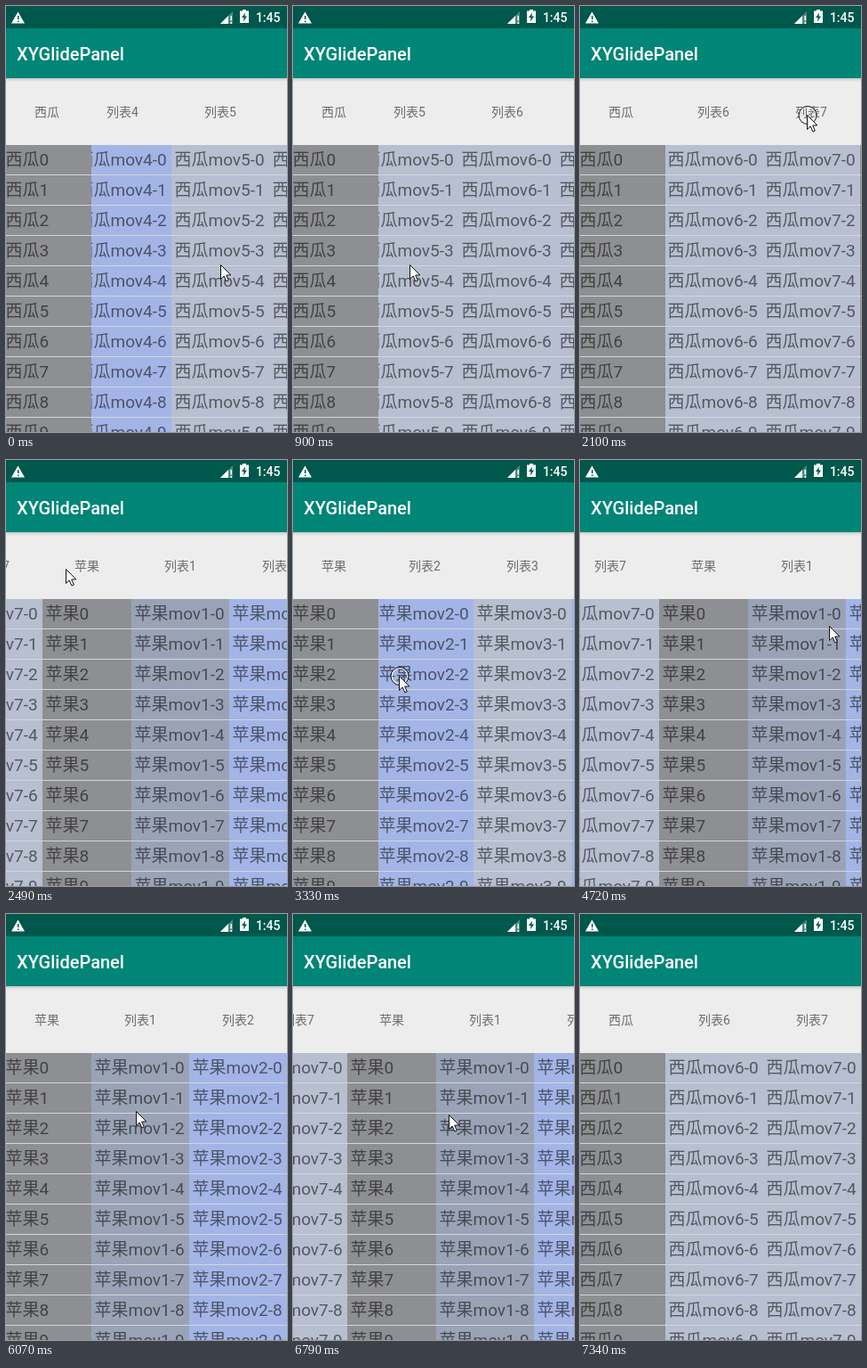
Animation, 316 px wide and 478 px high, one loop 8300 ms. Source, as an HTML page with a canvas:

```html
<!DOCTYPE html>
<html lang="zh-CN">
<head>
<meta charset="utf-8">
<style>
html, body { margin: 0; width: 100%; height: 100%; overflow: hidden; background: #ededed; }
canvas { display: block; }
</style>
</head>
<body>
<canvas id="stage" width="316" height="478"></canvas>
<script>
const ctx = document.getElementById('stage').getContext('2d');
const W = 316, H = 478, LOOP = 8300;
const FONT = 'Roboto, "Noto Sans CJK SC", "Noto Sans CJK", sans-serif';
const INK = 'rgba(0,0,0,.54)', BAR = '#00574b';
const TOP = 156, ROW = 34, FIRST = 100, COL = 110, GROUP = FIRST + 7 * COL, PIN = 96;
const GREY = '#8e8f93', SLATE = '#9aa3b6', BLUE = '#a3b5e6', PALE = '#b7bfd0';
const FILLS = [GREY, SLATE, BLUE, PALE, BLUE, PALE, PALE, PALE];
const GROUPS = ['西瓜', '苹果'];

// Scroll offsets where the first group ends and the second begins.
const END = GROUP - W, BEGIN = GROUP + FIRST - PIN;
const START = 354, SETTLE = 220, RING = 120;

// Horizontal drags; the last one only takes the pointer off the stage.
const DRAGS = [
  { down: 300, up: 900, y: 290, from: 241, to: 131 },
  { down: 1200, up: 1700, y: 240, from: 240, to: 150 },
  { down: 2100, up: 2400, y: 122, from: 256, to: 67 },
  { down: 2800, up: 3080, y: 242, from: 260, to: 147 },
  { down: 3330, up: 3800, y: 242, from: 119, to: 232 },
  { down: 4420, up: 4720, y: 186, from: 189, to: 280 },
  { down: 5530, up: 5850, y: 221, from: 265, to: 146 },
  { down: 6640, up: 7000, y: 225, from: 110, to: 264 },
  { down: 7340, up: LOOP, y: 225, from: 340, to: 340 }
];

// A drag that stops between the groups snaps on in its own direction.
let offset = START;
for (const d of DRAGS) {
  d.start = offset;
  d.free = offset + d.from - d.to;
  const between = d.free > END && d.free < BEGIN;
  offset = d.rest = between ? (d.to < d.from ? BEGIN : END) : d.free;
}

const mix = (a, b, u) => a + (b - a) * u;
const part = (t, a, b) => Math.min(1, Math.max(0, (t - a) / (b - a)));
const smooth = u => u * u * (3 - 2 * u);
const easeOut = u => 1 - (1 - u) ** 2;

function pose(t) {
  const i = Math.max(0, DRAGS.findLastIndex(d => t >= d.down));
  const d = DRAGS[i], next = DRAGS[i + 1] || d;
  const dragged = part(t, d.down, d.up);
  const settled = easeOut(part(t, d.up, d.up + SETTLE));
  const glide = next === d ? 0 : smooth(part(t, d.up + SETTLE, next.down));
  return {
    scroll: Math.round(mix(mix(d.start, d.free, dragged), d.rest, settled)),
    x: Math.round(mix(mix(d.from, d.to, dragged), next.from, glide)),
    y: Math.round(mix(d.y, next.y, glide)),
    pressed: t >= d.down && t < d.down + RING
  };
}

function rect(x, y, w, h, fill) {
  ctx.fillStyle = fill;
  ctx.fillRect(x, y, w, h);
}

function text(str, x, y, size, fill = INK, weight = 400, align = 'left') {
  ctx.font = `${weight} ${size}px ${FONT}`;
  ctx.textAlign = align;
  ctx.fillStyle = fill;
  ctx.fillText(str, x, y);
}

function poly(points, fill) {
  ctx.beginPath();
  points.forEach(p => ctx.lineTo(...p));
  ctx.closePath();
  ctx.fillStyle = fill;
  ctx.fill();
}

function column(g, n, x, w) {
  if (x >= W || x + w <= 0) return;
  ctx.save();
  ctx.beginPath();
  ctx.rect(x, 84, w, H);
  ctx.clip();
  rect(x, 84, w, TOP - 84, '#ededed');
  text(n ? '列表' + n : GROUPS[g], x + w / 2, 124, 14, INK, 400, 'center');
  rect(x, TOP, w, H - TOP, FILLS[n]);
  for (let r = 0, y = TOP; y < H; r++, y += ROW) {
    text(GROUPS[g] + (n ? `mov${n}-` : '') + r, x + 3.5, y + 23, 19);
    rect(x, y + ROW - 1, w, 1, '#d3d5da');
  }
  ctx.restore();
}

function table(scroll) {
  GROUPS.forEach((_, g) => {
    const x = g * GROUP - scroll;
    column(g, 0, x, FIRST);
    for (let n = 1; n < 8; n++) column(g, n, x + FIRST + (n - 1) * COL, COL);
  });
  // The first column of a group stays pinned while the group fills the left edge.
  GROUPS.forEach((_, g) => {
    const x = g * GROUP - scroll;
    if (x <= PIN - FIRST && x + GROUP >= PIN) column(g, 0, PIN - FIRST, FIRST);
  });
}

function bars() {
  rect(0, 0, W, 25, BAR);
  rect(0, 25, W, 56, '#008577');
  const shade = ctx.createLinearGradient(0, 81, 0, 85);
  shade.addColorStop(0, '#c8cbca');
  shade.addColorStop(1, '#ededed');
  rect(0, 81, W, 4, shade);
  text('XYGlidePanel', 12, 61, 20, '#fff', 500);
  text('1:45', 308.5, 18, 14, '#fff', 500, 'right');

  // Warning, signal and battery
  poly([[13.5, 6.5], [21, 19.5], [6, 19.5]], '#fff');
  rect(13, 11, 1.5, 4, BAR);
  rect(13, 16.5, 1.5, 1.5, BAR);

  poly([[255, 6], [255, 20], [241, 20]], 'rgba(255,255,255,.3)');
  poly([[250, 11], [250, 20], [241, 20]], '#fff');
  rect(252.5, 11, 1.5, 5.5, '#fff');
  rect(252.5, 18, 1.5, 2, '#fff');

  rect(266, 4, 4, 2, '#fff');
  rect(263, 5.5, 10, 13.5, '#fff');
  poly([[269, 7.5], [265, 13], [267.5, 13], [267, 17.5], [271, 11.5], [268.5, 11.5]], BAR);
}

function ring(x, y, r, width, stroke) {
  ctx.beginPath();
  ctx.arc(x, y, r, 0, Math.PI * 2);
  ctx.strokeStyle = stroke;
  ctx.lineWidth = width;
  ctx.stroke();
}

function pointer({ x, y, pressed }) {
  if (pressed) {
    ring(x + 1, y + .5, 9, 1.5, 'rgba(255,255,255,.8)');
    ring(x + 1, y + .5, 10, 1, '#111');
  }
  const arrow = [[0, 0], [0, 16], [3.7, 12.5], [6.4, 18.5], [8.8, 17.5], [6.2, 11.6], [11.3, 11.4]];
  poly(arrow.map(([dx, dy]) => [x + .5 + dx, y + .5 + dy]), '#fff');
  ctx.strokeStyle = '#111';
  ctx.lineWidth = 1;
  ctx.stroke();
}

function draw(time) {
  const now = pose(time);
  rect(0, 0, W, H, '#ededed');
  table(now.scroll);
  bars();
  pointer(now);
}

const start = performance.now();
function loop() {
  draw((performance.now() - start) % LOOP);
  requestAnimationFrame(loop);
}
loop();
</script>
</body>
</html>
```
